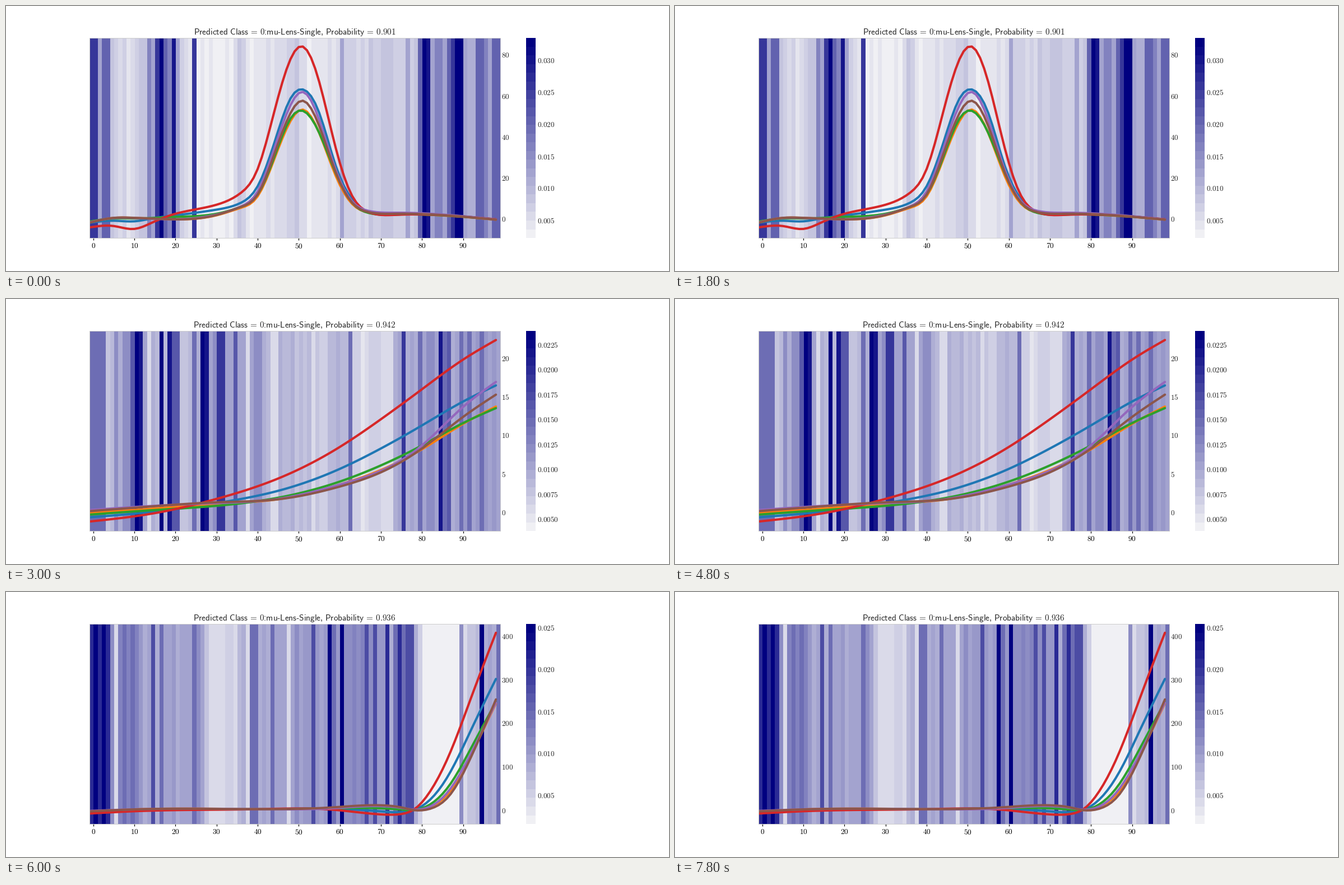
Write a matplotlib script that moves like this. It is 1183 px wide and 473 px high and loops after 9 s.

```python
import numpy as np
import matplotlib.pyplot as plt
from matplotlib.animation import FuncAnimation
from matplotlib.colors import LinearSegmentedColormap

W, H, DPI = 1183, 473, 64
PX = 72 / DPI  # points per pixel
STEPS = 23
INK = "0.15"
NAVY = LinearSegmentedColormap.from_list("light_navy", ["#f0f0f4", "#000080"], N=STEPS)

plt.rcParams.update({
    "font.family": "Liberation Sans",
    "mathtext.fontset": "cm",
    "lines.solid_capstyle": "round",
    "lines.solid_joinstyle": "round",
})

columns = np.arange(100)
times = columns - 1


def heat_levels(seed, xs, base, stripes):
    """Gently varying background with stripes given as {level: columns}."""
    rng = np.random.default_rng(seed)
    levels = np.interp(columns, xs, base) + rng.uniform(-0.8, 0.8, columns.size)
    for level, cols in stripes.items():
        levels[cols] = level
    return np.clip(levels, 0, STEPS - 1)


def spline(xs, ys):
    """Natural cubic spline through (xs, ys), sampled at every time step."""
    xs, ys = np.array(xs, float), np.array(ys, float)
    h, n = np.diff(xs), len(xs)
    slope = np.diff(ys) / h
    system, rhs = np.eye(n), np.zeros(n)
    for i in range(1, n - 1):
        system[i, i - 1:i + 2] = h[i - 1], 2 * (h[i - 1] + h[i]), h[i]
        rhs[i] = 6 * (slope[i] - slope[i - 1])
    m = np.linalg.solve(system, rhs)
    k = np.clip(np.searchsorted(xs, times, side="right") - 1, 0, n - 2)
    a, b = xs[k + 1] - times, times - xs[k]
    return ((m[k] * a**3 + m[k + 1] * b**3) / (6 * h[k])
            + (ys[k] / h[k] - m[k] * h[k] / 6) * a
            + (ys[k + 1] / h[k] - m[k + 1] * h[k] / 6) * b)


# Full event: one symmetric peak.
peak_heat = heat_levels(
    3,
    [5, 9, 12, 22, 24, 34, 36, 38, 46, 50, 53, 60, 68, 79, 92],
    [4, 2, 4, 4, 1, 0.5, 4.5, 1, 2, 4.5, 1, 2.5, 3.5, 4, 6],
    {22: [17, 81, 89, 90], 19.5: [20, 82], 17: [0, 1, 16, 25, 88],
     13: [3, 4, 18, 80, 87, 94, 95, 98, 99], 10: [14, 19, 84, 85, 96],
     7: [2, 15, 21, 61, 77, 83, 86, 91, 97]})
knots = [-1, 5, 10, 14, 19, 30, 36, 40, 44, 48, 51, 55, 59, 63, 67, 74, 98]
brown = spline(knots, [-1.8, .6, .6, .3, -.1, 2, 6, 12, 31.3, 51.7, 57.7, 45.3, 22.8, 8, 3.4, 2.6, -.3])
peak_curves = {
    "tab:blue": spline(knots, [-1.8, -.8, -1.1, .2, 1.6, 4.6, 8, 16, 36.8, 58.8, 63.2, 51.7, 26, 9.7, 3.4, 2.2, -.2]),
    "tab:orange": 0.925 * brown,
    "tab:green": spline(knots, [-1.2, .3, .3, .5, 1, 2.6, 6, 12, 30, 49, 52.8, 42, 22.5, 8, 3, 2.2, -.2]),
    "tab:red": spline(knots, [-4.1, -3.4, -4.8, -2, 2, 7, 12.9, 24.4, 52, 78, 84.1, 66.8, 34.7, 11.3, 3.4, 2.1, -.1]),
    "tab:purple": spline(knots, [-1.6, .5, .5, .2, -.1, 2.2, 6.2, 13.5, 34, 55.6, 62, 48.2, 24, 8.6, 4, 3.1, -.2]),
    "tab:brown": brown,
}

# Slow rise.
rise_heat = heat_levels(
    5,
    [4, 9, 13, 22, 29, 37, 43, 48, 56, 60, 63, 66, 70, 75, 99],
    [5, 8, 6, 4, 8, 7, 6, 6, 3, 6, 5, 1.5, 4, 6, 8],
    {22: [11, 17, 27], 20: [12, 19, 28, 85], 17: [31, 32, 76], 14: [10, 20, 21, 35, 87],
     11.5: [0, 1, 2, 3, 25, 63, 80, 86, 90, 92, 95], 9.5: [6, 8, 30, 40, 41, 82, 83],
     2: [14, 38, 44, 45, 54, 71, 72, 73]})
knots = [-1, 15, 30, 45, 60, 70, 80, 90, 98]
rise_curves = {
    "tab:blue": spline(knots, [-.65, .1, 1.2, 2.8, 5.65, 8.3, 11.3, 14.4, 16.5]),
    "tab:orange": spline(knots, [-.05, .5, 1.1, 1.7, 3.6, 5.5, 8.2, 11.5, 13.75]),
    "tab:green": spline(knots, [-.3, .3, .85, 1.9, 4, 6.1, 8.7, 11.6, 13.55]),
    "tab:red": spline(knots, [-1.2, -.1, 1.75, 4.4, 8.5, 12.1, 16, 19.85, 22.4]),
    "tab:purple": spline(knots, [.3, .85, 1.2, 1.75, 3.6, 5.4, 8.7, 13.7, 16.95]),
    "tab:brown": spline(knots, [.15, .8, 1.3, 1.7, 3.35, 5.2, 8.3, 12.4, 15.3]),
}

# Flat, then a steep rise at the end.
late_heat = heat_levels(
    8,
    [7, 11, 13, 24, 27, 29, 37, 42, 55, 66, 73, 79, 81, 88, 92, 97],
    [10, 10, 6.5, 7.5, 7, 2, 5.5, 6.5, 8, 10, 7, 5, 0, 0, 4, 6.5],
    {22: [1, 3, 58, 61, 95], 18: [0, 2, 4, 72, 75], 15: [15, 54, 67, 69, 77, 78],
     12: [8, 10, 17, 25, 39, 40, 44, 59, 74, 76, 99], 9: [5, 26, 50, 90],
     2: [6, 35, 38, 48]})
knots = [-1, 12, 40, 58, 70, 75, 78, 82, 87, 92, 98]
late_curves = {
    "tab:blue": spline(knots, [-4, 1, 3, 4, -2, -4, 1, 25, 90, 186, 302]),
    "tab:orange": spline(knots, [-2, 3, 3, 6, 11, 6, 1, 8, 46, 129, 246]),
    "tab:green": spline(knots, [-3, 2, 3, 5, 5, 2, 1, 14, 62, 144, 249]),
    "tab:red": spline(knots, [-7, -1, 3, 2, -9, -8, 2, 44, 136, 260, 408]),
    "tab:purple": spline(knots, [-1, 3, 3, 5, 10, 6, 2, 9, 51, 132, 248]),
    "tab:brown": spline(knots, [-2, 3, 3, 7, 12, 7, 1, 4, 38, 124, 255]),
}

SCENES = [
    dict(prob="0.901", heat=peak_heat, curves=peak_curves,
         ylim=(-9.2, 88.3), yticks=range(0, 81, 20),
         heat_range=(0.0022, 0.0335), heat_ticks=np.arange(1, 7) * 0.005, digits=3),
    dict(prob="0.942", heat=rise_heat, curves=rise_curves,
         ylim=(-2.42, 23.58), yticks=range(0, 21, 5),
         heat_range=(0.00379, 0.02388), heat_ticks=np.arange(2, 10) * 0.0025, digits=4),
    dict(prob="0.936", heat=late_heat, curves=late_curves,
         ylim=(-30.9, 428.3), yticks=range(0, 401, 100),
         heat_range=(0.00159, 0.02543), heat_ticks=np.arange(1, 6) * 0.005, digits=3),
]


def pixel_axes(left, top, right, bottom):
    return fig.add_axes([left / W, 1 - bottom / H, (right - left) / W, (bottom - top) / H])


def serif(text):
    return rf"$\mathrm{{{text}}}$"


def sans(text):
    return rf"$\mathsf{{{text}}}$"


def title(prob):
    return (r"$\mathsf{Predicted\ Class\,}=\mathsf{\,0}$:" + sans("mu") + "-" + sans("Lens")
            + "-" + sans("Single") + r",$\mathsf{\ Probability\,}=\mathsf{\,%s}$" % prob)


def right_ticks(ax, values, labels, pad):
    ax.yaxis.tick_right()
    ax.set_yticks(list(values), [serif(s) for s in labels])
    ax.tick_params(axis="y", length=0, pad=pad * PX, labelsize=13.1 * PX, labelcolor=INK)


fig = plt.figure(figsize=(W / DPI, H / DPI), dpi=DPI, facecolor="white")
main = pixel_axes(148.5, 57, 881.5, 414)
bar = pixel_axes(928, 57, 944.5, 414)


def draw_main(scene):
    main.clear()
    main.imshow([scene["heat"]], extent=(-1, 99, *scene["ylim"]), aspect="auto",
                cmap=NAVY, vmin=0, vmax=STEPS - 1, interpolation="nearest")
    for color, values in scene["curves"].items():
        main.plot(times, values, color=color, lw=4.1 * PX)
    main.set(xlim=(-1, 99), ylim=scene["ylim"])
    main.spines[:].set(color="0.8", linewidth=PX)
    xs = range(0, 91, 10)
    main.set_xticks(xs, [sans(x) for x in xs])
    main.tick_params(axis="x", length=4 * PX, width=1.2 * PX, pad=4 * PX,
                     labelsize=13.4 * PX, color="black", labelcolor="black")
    right_ticks(main, scene["yticks"], scene["yticks"], 2.5)
    main.set_title(title(scene["prob"]), fontsize=15.2 * PX, color=INK, pad=5.5 * PX)


def draw_bar(scene):
    bar.clear()
    low, high = scene["heat_range"]
    bar.imshow(np.arange(STEPS)[:, None], extent=(0, 1, low, high), origin="lower",
               aspect="auto", cmap=NAVY, interpolation="nearest")
    bar.set_xticks([])
    bar.spines[:].set_visible(False)
    ticks = scene["heat_ticks"]
    right_ticks(bar, ticks, [f"{t:.{scene['digits']}f}" for t in ticks], 3.5)
    bar.set_ylim(low, high)


def update(frame):
    scene = SCENES[frame % len(SCENES)]
    draw_main(scene)
    draw_bar(scene)
    return []


anim = FuncAnimation(fig, update, frames=len(SCENES), interval=3000,
                     repeat=True, repeat_delay=0, init_func=lambda: update(0))
plt.show()
```
